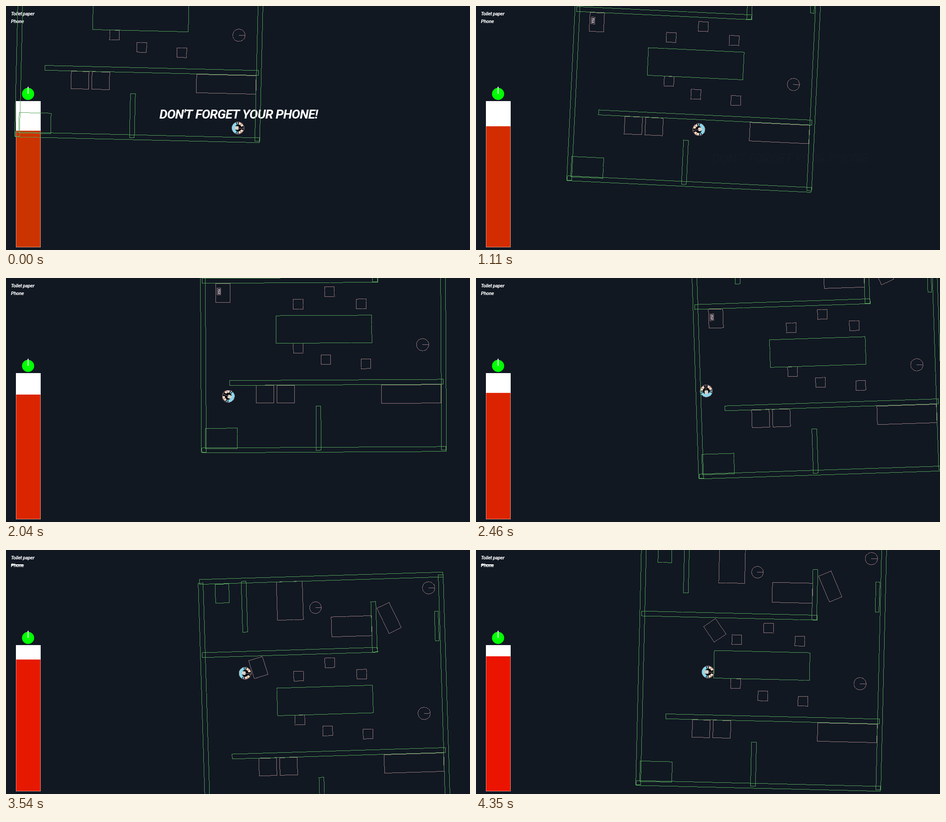
An HTML page with a canvas that plays this animation: 1030x544 px, repeating every 4380 ms.

```html
<!DOCTYPE html>
<html lang="en">
<head>
<meta charset="utf-8">
<title>Don't forget your phone</title>
<style>
html, body { margin: 0; width: 100%; height: 100%; overflow: hidden; background: #111822; }
canvas { display: block; }
</style>
</head>
<body>
<canvas id="stage" width="1030" height="544"></canvas>
<script>
const ctx = document.getElementById('stage').getContext('2d');
const W = 1030, H = 544, LOOP = 4380, STEP = 30;
const CX = 515, CY = 272;       // screen point the room turns around
const LAG = 92;                 // how far the camera trails the player, in ms
const PICKUP = 3000, HITCH = 3090;
const BG = '#111822', FIXED = '#56a45a', LOOSE = '#9c7c7f', INK = '#05070a';
const SKIN = '#ffd9c4', SHIRT = '#86d9ee';
const RAD = Math.PI / 180;

// Camera route through the room: time, x, y
const route = [
  [0, 494, -20.8], [720, 383.5, -96.9], [1080, 313, -122.5], [1560, 201.8, -79.8],
  [2160, 54.9, -117.8], [2460, 25.2, -164.4], [3090, 23.1, -322.2], [3270, 28, -339],
  [3540, 81, -332.6], [3810, 119, -320], [4350, 153.1, -245.7]
];

const clamp = v => Math.max(0, Math.min(1, v));
const ramp = (t, from, to) => clamp((t - from) / (to - from));
const ease = k => k * k * (3 - 2 * k);

// Position and velocity on the route, standing still at both ends
function follow(t) {
  let i = 0;
  while (i < route.length - 2 && t >= route[i + 1][0]) i++;
  const a = route[i], b = route[i + 1], d = b[0] - a[0], k = clamp((t - a[0]) / d);
  const slope = (n, axis) => {
    const p = route[n - 1], q = route[n + 1];
    return p && q ? (q[axis] - p[axis]) / (q[0] - p[0]) * d : 0;
  };
  const axes = [1, 2].map(axis => {
    const m0 = slope(i, axis), m1 = slope(i + 1, axis), gap = b[axis] - a[axis];
    const c2 = 3 * gap - 2 * m0 - m1, c3 = m0 + m1 - 2 * gap;
    return [a[axis] + k * (m0 + k * (c2 + k * c3)), (m0 + k * (2 * c2 + 3 * k * c3)) / d];
  });
  return { x: axes[0][0], y: axes[1][0], vx: axes[0][1], vy: axes[1][1] };
}

function turn(x, y, deg) {
  const c = Math.cos(deg * RAD), s = Math.sin(deg * RAD);
  return [x * c - y * s, x * s + y * c];
}

// Crisp one-pixel line
function line([x0, y0], [x1, y1]) {
  const n = Math.max(1, Math.round(Math.max(Math.abs(x1 - x0), Math.abs(y1 - y0))));
  for (let i = 0; i <= n; i++) {
    const x = Math.floor(x0 + (x1 - x0) * i / n), y = Math.floor(y0 + (y1 - y0) * i / n);
    if (x >= 0 && x < W && y >= 0 && y < H) ctx.fillRect(x, y, 1, 1);
  }
}

function outline(points) {
  points.forEach((p, i) => line(p, points[(i + 1) % points.length]));
}

function ring([x, y], r, deg) {
  const points = Array.from({ length: 20 }, (_, i) => {
    const [dx, dy] = turn(r, 0, deg + i * 18);
    return [x + dx, y + dy];
  });
  outline(points);
  line([x, y], points[0]);
}

function disc(color, x, y, r) {
  ctx.fillStyle = color;
  ctx.beginPath();
  ctx.arc(x, y, r, 0, 7);
  ctx.fill();
}

function arc(color, from, to, width) {
  ctx.strokeStyle = color;
  ctx.lineWidth = width;
  ctx.beginPath();
  ctx.arc(0, 0, 10.3, from * RAD, to * RAD);
  ctx.stroke();
}

function drawPlayer(x, y, deg) {
  ctx.save();
  ctx.translate(x, y);
  ctx.rotate(deg * RAD);
  disc(INK, -1, 0, 11);
  for (const side of [-1, 1]) {
    ctx.save();
    ctx.scale(1, side);
    arc(SKIN, 22, 82, 5);
    arc(INK, 50, 54, 3);
    arc(SHIRT, 92, 104, 5);
    arc(SHIRT, 112, 181, 6);
    ctx.restore();
  }
  ctx.fillStyle = '#d5d0cb';
  ctx.beginPath();
  ctx.roundRect(-7.5, -4, 9, 8, 2);
  ctx.fill();
  ctx.restore();
}

function drawPhone([x, y], deg) {
  ctx.save();
  ctx.translate(x, y);
  ctx.rotate(deg * RAD);
  ctx.fillStyle = '#b5a9b4';
  ctx.fillRect(-2.5, -5.5, 5, 11);
  ctx.fillStyle = '#30303c';
  ctx.fillRect(-1.5, -3.5, 2, 2);
  ctx.fillRect(-0.5, 0, 2, 3);
  ctx.restore();
}

// Narrowest bold italic at hand, at a size that keeps the label in its room
const families = ['Noto Sans CJK JP', 'Noto Sans CJK SC', 'Roboto', 'Open Sans'];
function fitFont(text, size, room) {
  const font = (family, px) => `italic bold condensed ${px}px "${family}", sans-serif`;
  const width = family => {
    ctx.font = font(family, size);
    return ctx.measureText(text).width;
  };
  ctx.letterSpacing = -size * 0.03 + 'px';
  const best = families.reduce((a, b) => width(b) < width(a) ? b : a);
  const scale = Math.min(1, room / width(best));
  ctx.letterSpacing = -size * scale * 0.03 + 'px';
  ctx.font = font(best, size * scale);
}

function drawHud(spent, gotPhone) {
  ctx.fillStyle = '#fff';
  ctx.textAlign = 'left';
  ctx.textBaseline = 'alphabetic';
  fitFont('Toilet paper', 13, 52);
  ctx.fillText('Toilet paper', 11, 21);
  ctx.fillText('Phone', 11, 37.5);
  if (gotPhone) ctx.fillRect(11, 32, 27, 2);

  const top = 278 - 41 * spent, left = (top - 212) / 326;
  ctx.fillRect(22, 212, 55, 326);
  ctx.fillStyle = `rgb(${255 * (1 - left)}, ${255 * left}, 0)`;
  ctx.fillRect(22.5, top, 54, 537.5 - top);

  disc('#0f0', 49, 196, 13.5);
  ctx.fillStyle = '#fff';
  ctx.fillRect(48, 180, 2, 16);
}

function drawHint(t, [x, y]) {
  const text = "DON'T FORGET YOUR PHONE!";
  ctx.globalAlpha = clamp((1120 - t) * 0.00135);
  ctx.fillStyle = '#fff';
  ctx.textAlign = 'center';
  fitFont(text, 37, 352);
  const { actualBoundingBoxAscent: up, actualBoundingBoxDescent: down } = ctx.measureText(text);
  ctx.fillText(text, x, y + (up - down) / 2 - t * 0.0097);
  ctx.globalAlpha = 1;
}

function draw(t) {
  // Game time runs evenly, with one short skip after the pickup
  const phase = 78 * t / 1000 + 20.7 * ramp(t, HITCH, 3540);
  const tilt = 3 * Math.sin((27.2 + phase) * RAD);
  const cam = follow(t);
  const at = (x, y) => {
    const [dx, dy] = turn(x - cam.x, y - cam.y, tilt);
    return [CX + dx, CY + dy];
  };
  const box = (x, y, w, h) => outline([at(x, y), at(x + w, y), at(x + w, y + h), at(x, y + h)]);
  const hwall = (x, y, length) => box(x, y, length, 10.8);
  const vwall = (x, y, length) => box(x, y, 10.8, length);
  const tilted = (x, y, w, h, deg) => outline([[-1, -1], [1, -1], [1, 1], [-1, 1]].map(([a, b]) => {
    const [dx, dy] = turn(a * w / 2, b * h / 2, deg);
    return at(x + dx, y + dy);
  }));

  ctx.fillStyle = BG;
  ctx.fillRect(0, 0, W, H);

  // The player runs ahead of the camera and looks where they go
  const [px, py] = at(cam.x + cam.vx * LAG, cam.y + cam.vy * LAG);
  const face = Math.atan2(cam.vy, cam.vx + 0.02) / RAD + tilt;
  const nudge = ramp(t, PICKUP, HITCH);
  const phone = [40 + 1.6 * nudge, -348.5 - 2.8 * nudge];
  if (t < PICKUP) drawPhone(at(...phone), tilt);
  drawPlayer(px, py, face);

  drawHud(phase / 360, t >= PICKUP);
  drawHint(t, at(494.5, -52.8));

  ctx.fillStyle = LOOSE;
  for (let i = 0; i < 2; i++) box(121.2 + 46.1 * i, -138.5, 39, 39); // cabinets
  box(399.4, -138.2, 132, 41);       // counter
  box(291.5, -449, 89.5, 44.5);      // sofa
  box(172.2, -530.7, 57.5, 85.5);    // bed
  for (let i = 0; i < 3; i++) {      // chairs on both sides of the table
    box(204.5 + 70 * i, -330 - 27.6 * (i % 2), 21.5, 21.5);
    box(204.3 + 46.9 * i + 14.1 * i * i, -232.2 + 34.5 * i - 8.3 * i * i, 21.5, 21.5);
  }
  ring(at(491.2, -227.6), 13.7, tilt);
  ring(at(257.5, -470.8), 13, tilt);
  ring(at(509.8, -507), 13.7, tilt);
  tilted(419.8, -442.8, 30, 62.5, -24.2);
  const push = ease(ramp(t, 2900, 3950));
  tilted(48.7 + 117.3 * push, -345.3 + 6.3 * push, 32, 42, -36 * push * push);
  if (t < HITCH + STEP) tilted(...phone, 8, 15, -13 * nudge);
  ring([px, py], 13.7, face);

  ctx.fillStyle = FIXED;
  hwall(0, 0, 542);
  hwall(1.5, -541.3, 541);
  vwall(-1.2, -533, 542.5);
  vwall(532, -535, 542.5);
  hwall(62.2, -150, 474);
  hwall(2.8, -378, 389.5);
  vwall(253.6, -92, 98.5);
  vwall(380.6, -480.2, 112);
  vwall(94.3, -534.2, 113.2);
  box(166, -294, 212.5, 61.5);       // table
  box(7.5, -43.7, 71, 45.5);         // doormat
  box(36.1, -529.5, 30.5, 42);       // toilet
  box(521, -454.8, 8.5, 66.5);       // screen
}

const start = performance.now();
function frame() {
  const t = (performance.now() - start) % LOOP;
  draw(Math.floor(t / STEP) * STEP);
  requestAnimationFrame(frame);
}
frame();
</script>
</body>
</html>
```
